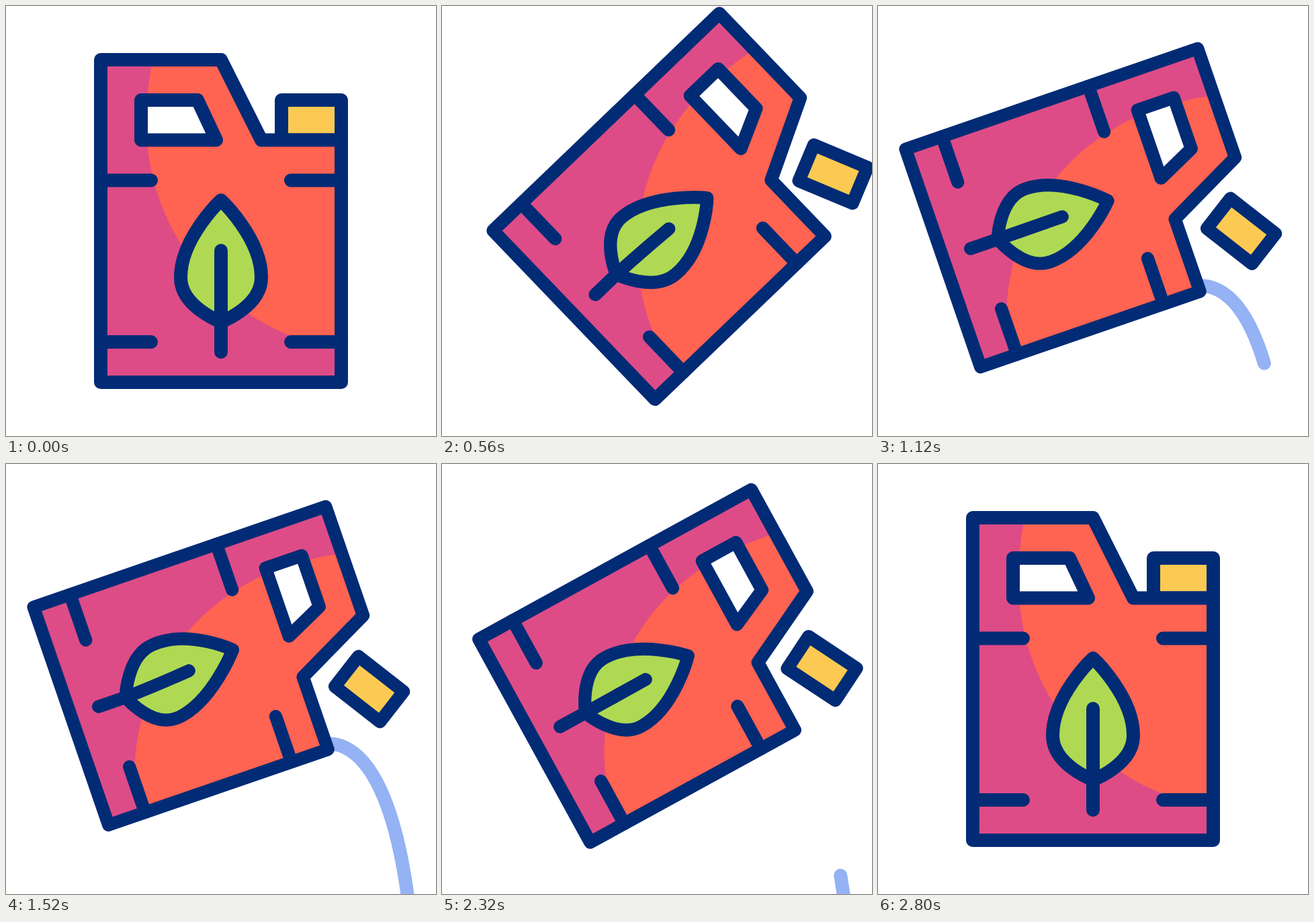
An HTML page that plays this animation: 640 px wide and 640 px high, repeating every 3 s.

```html
<!DOCTYPE html>
<html lang="en">
<head>
<meta charset="utf-8">
<title>Pouring canister</title>
<style>
  html, body { margin: 0; width: 100%; height: 100%; overflow: hidden; background: #fff; }
  svg { display: block; width: 100%; height: 100%; }
  .line { fill: none; stroke: #022b75; stroke-width: 20; stroke-linecap: round; stroke-linejoin: round; }
</style>
</head>
<body>
<svg viewBox="0 0 640 640">
  <path id="stream" d="M478 416C545 416 583 520 600 660" fill="none" stroke="#94b2f4" stroke-width="20" stroke-linecap="round"/>
  <g id="can">
    <g id="cap">
      <path class="line" style="fill:#fcca52" d="M410 140H499V199.500H410Z"/>
    </g>
    <path fill="#dd4c87" d="M141 80H320L380 199.500H499V560H141Z"/>
    <path fill="#ff6351" d="M218 80Q209 125 209 175A340 340 0 0 0 499 511.300V199.500H380L320 80Z"/>
    <path class="line" d="M141 80H320L380 199.500H499V560H141Z"/>
    <path class="line" style="fill:#fff" d="M201 140H285L313 199.500H201Z"/>
    <path class="line" d="M141 259.500H216M424 259.500H499M141 500H216M424 500H499"/>
    <path id="leaf" class="line" style="fill:#afd953"/>
    <path id="stem" class="line"/>
  </g>
</svg>
<script>
const LOOP = 3000;
const $ = id => document.getElementById(id);
const [stream, can, cap, leaf, stem] = ['stream', 'can', 'cap', 'leaf', 'stem'].map($);
const streamLength = stream.getTotalLength();

// [time in ms, value]
const tracks = {
  tilt: [[200, 0], [800, 1], [2200, 1], [2720, 0]],
  open: [[200, 0], [760, 1], [2200, 1], [2680, 0]],
  sway: [[200, 0], [800, 18], [1400, -16.2], [2480, 0]],
  head: [[800, 0], [1400, 1]],
  tail: [[1920, 0], [2460, 1]]
};

const ease = s => s * s * (3 - 2 * s);

function valueAt(keys, t) {
  if (t <= keys[0][0]) return keys[0][1];
  for (let i = 1; i < keys.length; i++) {
    const [t0, v0] = keys[i - 1], [t1, v1] = keys[i];
    if (t < t1) return v0 + (v1 - v0) * ease((t - t0) / (t1 - t0));
  }
  return keys[keys.length - 1][1];
}

// The leaf bends sideways, more so towards its tip.
function drawLeaf(sway) {
  const pt = (x, y) => {
    const h = Math.max(0, (470 - y) / 181);
    return `${x + sway * h ** 1.5} ${y} `;
  };
  const tip = pt(320, 289), base = pt(320, 470);
  leaf.setAttribute('d',
    `M${tip}C${tip}${pt(260, 345)}${pt(260, 404)}C${pt(260, 448)}${base}${base}` +
    `C${base}${pt(380, 448)}${pt(380, 404)}C${pt(380, 345)}${tip}${tip}Z`);
  stem.setAttribute('d',
    `M${pt(320, 515)}L${base}C${pt(320, 435)}${pt(320, 400)}${pt(320, 364)}`);
}

function drawStream(head, tail) {
  const from = tail * streamLength, size = (head - tail) * streamLength;
  const shown = head > 0 && tail < 1;
  stream.style.display = shown ? '' : 'none';
  if (shown) stream.setAttribute('stroke-dasharray', `0 ${from} ${size} ${streamLength * 2}`);
  // Skip the round dot that a zero-length first dash would leave.
  stream.setAttribute('stroke-dashoffset', 0);
  if (shown && from > 0) {
    stream.setAttribute('stroke-dasharray', `${size} ${streamLength * 2}`);
    stream.setAttribute('stroke-dashoffset', -from);
  }
}

function draw(t) {
  const v = {};
  for (const name in tracks) v[name] = valueAt(tracks[name], t);
  const { tilt, open } = v;
  can.setAttribute('transform',
    `translate(${141 - 100 * tilt} ${560 - 347 * tilt}) rotate(${71 * tilt}) ` +
    `scale(${1 - 0.042 * tilt}) translate(-141 -560)`);
  cap.setAttribute('transform', `translate(0 ${-42 * open}) rotate(${-33 * open} 410 199.500)`);
  drawLeaf(v.sway);
  drawStream(v.head, v.tail);
}

const start = performance.now();
function tick() {
  draw((performance.now() - start) % LOOP);
  requestAnimationFrame(tick);
}
tick();
</script>
</body>
</html>
```
